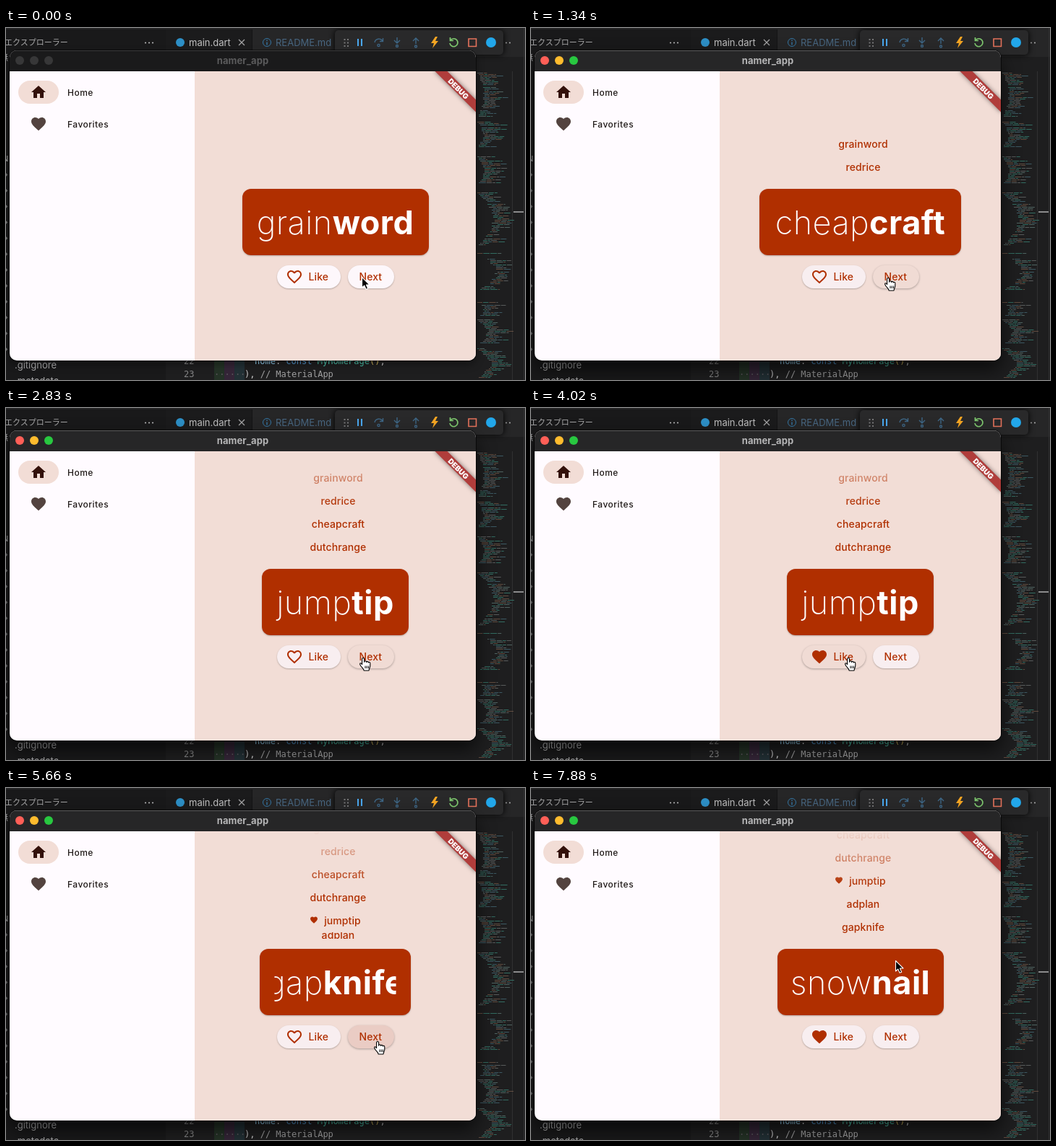
Write an HTML page with a canvas that moves like this. It is 718 by 488 pixels and loops after 8000 ms.

```html
<!DOCTYPE html>
<html lang="en">
<head>
<meta charset="utf-8">
<title>namer_app</title>
<style>
  html, body { margin: 0; width: 100%; height: 100%; overflow: hidden; background: #1b1b1c; }
  #stage { position: relative; width: 718px; height: 488px; overflow: hidden;
    font-family: Inter, "Noto Sans CJK JP", "Noto Sans CJK", sans-serif; }
  #stage div, #stage canvas, #stage svg { position: absolute; }
  .t { white-space: pre; line-height: 20px; height: 20px; }
  .mono { font: 12px/18px "DejaVu Sans Mono", monospace; white-space: pre; color: #c8c8c9; }

  #window { left: 5px; top: 31px; width: 645px; height: 430px; border-radius: 10px;
    box-shadow: 0 5px 12px rgba(0,0,0,.4), 0 0 0 1px rgba(0,0,0,.5); }
  #window.active { box-shadow: 0 12px 26px rgba(0,0,0,.65), 0 0 0 1px rgba(0,0,0,.6); }
  #clip { inset: 0; border-radius: 10px; overflow: hidden; background: #fffbff; }
  #bar { left: 0; top: 0; width: 645px; height: 29px; background: #1a1a1b; box-shadow: inset 0 1px #3b3b3c; }
  .active #bar { background: #262627; box-shadow: inset 0 1px #5c5c5d; }
  #bar b { position: absolute; left: 0; width: 645px; text-align: center; font-size: 13px; font-weight: 700;
    line-height: 28px; color: #5b5b5c; letter-spacing: .1px; }
  .active #bar b { color: #b6b6b7; }
  .light { top: 8px; width: 12px; height: 12px; border-radius: 50%; background: #373738; }
  .active .light { background: var(--c); }
  #pane { left: 256px; top: 29px; width: 389px; height: 401px; overflow: hidden; background: #f2ddd6; }
  #pill { left: 12px; top: 42px; width: 56px; height: 32px; border-radius: 16px; background: #f2ddd6; }
  .nav { left: 80px; font-size: 12px; font-weight: 500; letter-spacing: .5px; color: #201a18; }
  #ribbon { left: 325px; top: 18px; width: 80px; height: 12px; transform: rotate(45deg); background: #b03d3b;
    box-shadow: 0 0 6px rgba(0,0,0,.5); color: #fff; font-size: 10.2px; font-weight: 900; line-height: 12px; text-align: center; }

  #list { left: 261px; top: 60px; width: 389px; height: 149px; overflow: hidden;
    -webkit-mask-image: linear-gradient(transparent, #000 50%); mask-image: linear-gradient(transparent, #000 50%); }
  .item { left: 0; width: 389px; height: 30px; padding-bottom: 2px; display: flex; align-items: center; justify-content: center; gap: 8px; }
  .item svg { position: static !important; }
  .item, .button { color: #b02f00; font-size: 14px; font-weight: 550; letter-spacing: .1px; }
  #card { top: 223px; height: 92px; border-radius: 12px; background: #b02f00; box-shadow: 0 1px 2px rgba(0,0,0,.25); }
  #word { left: 20px; right: 20px; top: 21px; height: 54px; display: flex; justify-content: center;
    color: #fff; font-size: 45px; line-height: 52px; white-space: pre; font-weight: 200; letter-spacing: .45px; }
  #word b { font-weight: 700; }
  .button { top: 329px; height: 32px; border-radius: 16px; line-height: 32px; box-shadow: 0 1px 2px rgba(0,0,0,.25); }
  .button.hover { box-shadow: 0 1px 3px rgba(0,0,0,.3); }
  .button span { position: absolute; top: 0; }
</style>
</head>
<body>
<div id="stage">
  <svg width="718" height="488" viewBox="0 0 718 488" fill="none" id="editor">
    <path fill="#1e1e1f" d="M0 0h718v488H0z"/>
    <path fill="#19191a" d="M0 0h221v488H0z"/>
    <path fill="#262627" d="M221 0h497v40H221z"/>
    <path fill="#1b1b1c" d="M221 2h119v38H221z"/>
    <path fill="#252526" d="M0 0h718v2H0z"/>
    <path fill="#151516" d="M340 2h1v38h-1z"/>
    <circle cx="241" cy="20" r="6" fill="#2d8fc6"/>
    <path stroke="#a5a5a6" stroke-width="1.2" d="M322 16l8 8m0-8l-8 8"/>
    <circle cx="361" cy="20" r="5.5" stroke="#3576a4"/>
    <path stroke="#3576a4" stroke-width="1.4" d="M361 16.5v1.6m0 1.4v4"/>
    <g fill="#b5b5b6">
      <circle cx="193" cy="20.500" r="1.100"/><circle cx="198" cy="20.500" r="1.100"/><circle cx="203" cy="20.500" r="1.100"/>
      <circle cx="692" cy="20.500" r="1"/><circle cx="697" cy="20.500" r="1"/>
    </g>
    <path fill="#2b4a30" fill-opacity=".45" d="M288 450h14v38h-14z"/>
    <path fill="#472d4b" fill-opacity=".55" d="M302 450h14v38h-14z"/>
    <path fill="#264650" fill-opacity=".45" d="M316 450h14v38h-14z"/>
    <path stroke="#303031" d="M700.500 60v428M716.500 0v488"/>
  </svg>
  <canvas id="minimap" width="68" height="488" style="left:650px;top:0"></canvas>
  <svg width="718" height="60" viewBox="0 0 718 60" fill="none" stroke-width="1.4">
    <rect x="455" y="3" width="233" height="34" rx="5" fill="#29292a" style="filter:drop-shadow(0 0 4px #000)"/>
    <path stroke="#777778" stroke-width="2" stroke-dasharray="2 2.500" d="M468.500 15v11M473 15v11"/>
    <path stroke="#4aa8f0" stroke-width="2" d="M487 15v10m5-10v10"/>
    <g stroke="#3e6685">
      <path d="M510 20a6 6 0 0 1 11-2m.5-4v4.500h-4.500"/><circle cx="515.500" cy="24" r="1.600"/>
      <path d="M541 13v8m-4-4l4 4 4-4"/><circle cx="541" cy="25" r="1.500"/>
      <path d="M567 22v-8m-4 4l4-4 4 4"/><circle cx="567" cy="25.500" r="1.500"/>
    </g>
    <path fill="#f5a623" d="M594 12l-6 9h4l-2 7 8-10h-4l3-6z"/>
    <path stroke="#7fc96f" stroke-width="1.700" d="M615 17a5.500 5.500 0 1 1-1 4m.5-8v4.500h4.500"/>
    <path stroke="#e5735c" stroke-width="1.600" d="M640 15h10.500v10.500h-10.500z"/>
    <circle cx="671" cy="20" r="7" fill="#22a7ea"/>
  </svg>
  <div id="labels"></div>

  <div id="window"><div id="clip">
    <div id="bar"><b>namer_app</b></div>
    <div id="pane"><div id="ribbon">DEBUG</div></div>
    <div id="pill"></div>
    <div class="t nav" style="top:49px">Home</div>
    <div class="t nav" style="top:93px">Favorites</div>
    <svg width="24" height="24" style="left:28px;top:46px"><path fill="#33110a" d="M10 20v-6h4v6h5v-8h3L12 3 2 12h3v8z"/></svg>
    <svg width="24" height="24" style="left:28px;top:90px"><path class="heart" fill="#53433f"/></svg>
  </div></div>

  <div id="list"></div>
  <div id="card"><div id="word"><span></span><b></b></div></div>
  <div id="like" class="button" style="left:375px;width:87.500px">
    <svg width="24" height="24" style="left:11.500px;top:4px"><path fill="#b02f00"/></svg><span style="left:43.500px">Like</span>
  </div>
  <div id="next" class="button" style="left:473px;width:63.500px"><span style="left:15.500px">Next</span></div>

  <svg id="arrow" width="16" height="22" style="left:-1px;top:-1px">
    <path transform="translate(1 1)" fill="#000" stroke="#fff" stroke-width="1.100" stroke-linejoin="round"
      d="M.5.500v14.500l3.300-3 2.300 5.300 2.600-1.100-2.300-5.200h4.600z"/>
  </svg>
  <svg id="hand" width="18" height="21" style="left:-5px;top:0">
    <path fill="#fff" stroke="#000" stroke-width="1.100" stroke-linejoin="round"
      d="M3.600 9.500V2a1.500 1.500 0 0 1 3 0v4.200q.3-1.400 1.500-1.400 1.300 0 1.400 1.600.4-1 1.400-1 1.300 0 1.400 1.600.4-.7 1.200-.7 1.300 0 1.300 1.700V11c0 3-1.500 4-1.800 7H6.200C6 15.500 3.400 14 1.600 11.200.6 9.600.2 8.600 1 8c.9-.6 1.800.3 2.600 1.500z"/>
    <path stroke="#000" d="M8 11.500v3.500m2.200-3.500v3.500m2.200-3.500v3.500"/>
  </svg>
</div>

<script>
const $ = s => document.querySelector(s);
const LOOP = 8000, TICK = 148.9;
const HEART = 'M12 21.35l-1.45-1.32C5.4 15.36 2 12.28 2 8.5 2 5.42 4.42 3 7.5 3c1.74 0 3.41.81 4.5 2.09C13.09 3.81 14.76 3 16.5 3 19.58 3 22 5.42 22 8.5c0 3.78-3.4 6.86-8.55 11.54L12 21.35z';
const OUTLINE = 'M16.5 3c-1.74 0-3.41.81-4.5 2.09C10.91 3.81 9.24 3 7.5 3 4.42 3 2 5.42 2 8.5c0 3.78 3.4 6.86 8.55 11.54L12 21.35l1.45-1.32C18.6 15.36 22 12.28 22 8.5 22 5.42 19.58 3 16.5 3zm-4.4 15.55l-.1.1-.1-.1C7.14 14.24 4 11.39 4 8.5 4 6.5 5.5 5 7.5 5c1.54 0 3.04.99 3.57 2.36h1.87C13.46 5.99 14.96 5 16.5 5c2 0 3.5 1.5 3.5 3.5 0 2.89-3.14 5.74-7.9 10.05z';

// first half, second half, card width, click that brings the word, click that likes it
const words = [
  ['grain', 'word', 258, -1000],
  ['red', 'rice', 198, 270],
  ['cheap', 'craft', 279, 1030],
  ['dutch', 'range', 295, 1780],
  ['jump', 'tip', 203, 2480, 3570],
  ['ad', 'plan', 190, 4755],
  ['gap', 'knife', 233, 5574],
  ['snow', 'nail', 230, 6090, 7290]
].map(([a, b, width, at, liked = Infinity]) => ({ a, b, width, at, liked }));

// tick, x, y, button under the pointer
const pointer = [
  [0, 492, 345, ''], [1, 494, 346, 'next'],
  [20, 480, 347, 'next'], [21, 455, 346, 'like'], [22, 436, 345, 'like'],
  [27, 439, 346, 'like'], [28, 478, 349, 'next'], [29, 514, 351, 'next'],
  [43, 508, 348, 'next'], [44, 478, 344, 'next'], [45, 446, 342, 'like'],
  [46, 440, 344, 'like'], [47, 437, 345, 'like'],
  [51, 452, 322, ''], [52, 483, 275, ''], [53, 504, 239, '']
];

const clamp = v => Math.max(0, Math.min(1, v));
const lastOf = (list, test) => list.filter(test).pop();
const add = (parent, cls, css, html) => {
  const el = document.createElement('div');
  el.className = cls;
  el.style.cssText = css;
  el.innerHTML = html;
  parent.append(el);
  return el;
};

function buildEditor() {
  const box = $('#labels');
  const text = (x, y, s, color, size = 13) =>
    add(box, 't', `left:${x}px;top:${y - 10}px;color:${color};font-size:${size}px`, s);
  const code = (x, y, html) => add(box, 'mono', `left:${x}px;top:${y - 9}px`, html);
  const tint = (c, s) => `<span style="color:${c}">${s}</span>`;
  text(-2, 20, 'エクスプローラー', '#a8a8a9', 11);
  text(253, 20, 'main.dart', '#c0c0c1');
  text(373, 20, 'README.md', '#486680');
  text(-8, 41, '無', '#a8a8a9', 11);
  text(-5, 181, 'N', '#a8a8a9', 11);
  for (let i = 0; i < 12; i++) text(-3, 203 + i * 22, '›', '#88898a', 15);
  text(12, 467, '.gitignore', '#a9a9aa');
  text(12, 489, '.metadata', '#a9a9aa');
  code(246, 462, tint('#858586', '22'));
  code(246, 480, tint('#858586', '23'));
  code(344, 462, tint('#9cdcfe', 'home') + ': ' + tint('#569cd6', 'const ') + tint('#4ec9b0', 'MyHomePage') + tint('#dcc060', '()') + ',');
  code(288, 480, tint('#5a565c', '······'));
  code(330, 480, '), ' + tint('#a0a0a1', '// MaterialApp'));
}

function buildMinimap() {
  const g = $('#minimap').getContext('2d');
  let seed = 7;
  const rnd = () => (seed = seed * 16807 % 2147483647) / 2147483647;
  const colors = ['#6f8f8a', '#3f9d8b', '#3f9d8b', '#7d8182', '#8c6a55', '#4f7f8f'];
  const blocks = [[60, 124, 6], [130, 166, 5], [178, 218, 6], [228, 302, 15], [312, 364, 16], [380, 400, 6], [404, 440, 9], [444, 486, 10]];
  g.globalAlpha = .62;
  for (const [top, end, depth] of blocks)
    for (let y = top; y < end; y += 2) {
      if (rnd() < .1) continue;
      const arc = Math.sin((y - top) / (end - top) * Math.PI);
      let x = 2 + 2 * Math.round(arc * depth * (.7 + .3 * rnd()));
      for (let n = 1 + rnd() * 3; n > 0 && x < 44; n--) {
        const w = 2 + rnd() * 8;
        g.fillStyle = colors[rnd() * colors.length | 0];
        g.fillRect(x, y, w, 1);
        x += w + 1;
      }
    }
  g.globalAlpha = 1;
  g.fillStyle = '#8b8b8c';
  g.fillRect(52, 254, 14, 2);
}

buildEditor();
buildMinimap();
['#ff5f57', '#febc2e', '#28c840'].forEach((c, i) =>
  add($('#bar'), 'light', `left:${8 + i * 20}px;--c:${c}`, ''));
$('.heart').setAttribute('d', HEART);

const items = words.slice(0, -1).map(w => {
  const heart = w.liked < LOOP ? `<path fill="#b02f00" d="${HEART}"/>` : '';
  return add($('#list'), 'item', '', `<svg width="${heart ? 12 : 0}" height="12" viewBox="0 0 24 24">${heart}</svg><span>${w.a + w.b}</span>`);
});

const mix = (from, to, p) => `rgb(${from.map((v, i) => Math.round(v + (to[i] - v) * p))})`;
const IDLE = [253, 247, 251], NORMAL = [248, 238, 240], HOVER = [240, 219, 212], PRESSED = [233, 203, 195];

function drawButton(id, over, press, active) {
  const el = $('#' + id), hover = over === id;
  el.classList.toggle('hover', hover);
  el.style.background = mix(hover ? HOVER : active ? NORMAL : IDLE, PRESSED, hover ? press : 0);
}

function drawList(n, p) {
  items.forEach((el, i) => {
    const age = n - 1 - i;
    el.style.display = age < 0 ? 'none' : '';
    const mid = age ? 149 - 32 * p - 32 * age + 16 : 149 - 16 * p;
    el.style.top = mid - 16 + 'px';
    el.style.clipPath = age ? 'none' : `inset(${16 * (1 - p)}px 0)`;
  });
}

function drawCard(n, p) {
  const now = words[n], before = words[Math.max(0, n - 1)];
  const width = before.width + (now.width - before.width) * p;
  const card = $('#card').style;
  card.width = width + 'px';
  card.left = 455.5 - width / 2 + 'px';
  $('#word span').textContent = now.a;
  $('#word b').textContent = now.b;
  $('#word').style.clipPath = p < 1 ? 'inset(0)' : 'none';
}

function draw(t) {
  // the screen refreshes in coarse ticks
  const tick = Math.floor((t + 2) / 148.6), time = tick * TICK;
  const active = tick > 0;
  const word = lastOf(words, w => w.at <= time), n = words.indexOf(word);
  const since = time - word.at;
  const [, x, y, over] = lastOf(pointer, s => s[0] <= tick);
  const liked = time >= word.liked;

  $('#window').classList.toggle('active', active);
  drawList(n, clamp(since / 300));
  drawCard(n, clamp(since / 200));
  drawButton('next', over, since < 300 ? clamp(1.2 - since / 300) : 0, active);
  drawButton('like', over, liked ? clamp(1 - (time - word.liked) / 150) : 0, active);
  $('#like path').setAttribute('d', liked ? HEART : OUTLINE);

  for (const id of ['arrow', 'hand']) {
    const style = $('#' + id).style;
    style.display = (id === 'hand') === !!over ? '' : 'none';
    style.transform = `translate(${x}px, ${y}px)`;
  }
}

const start = performance.now();
function frame() {
  draw((performance.now() - start) % LOOP);
  requestAnimationFrame(frame);
}
frame();
</script>
</body>
</html>
```
